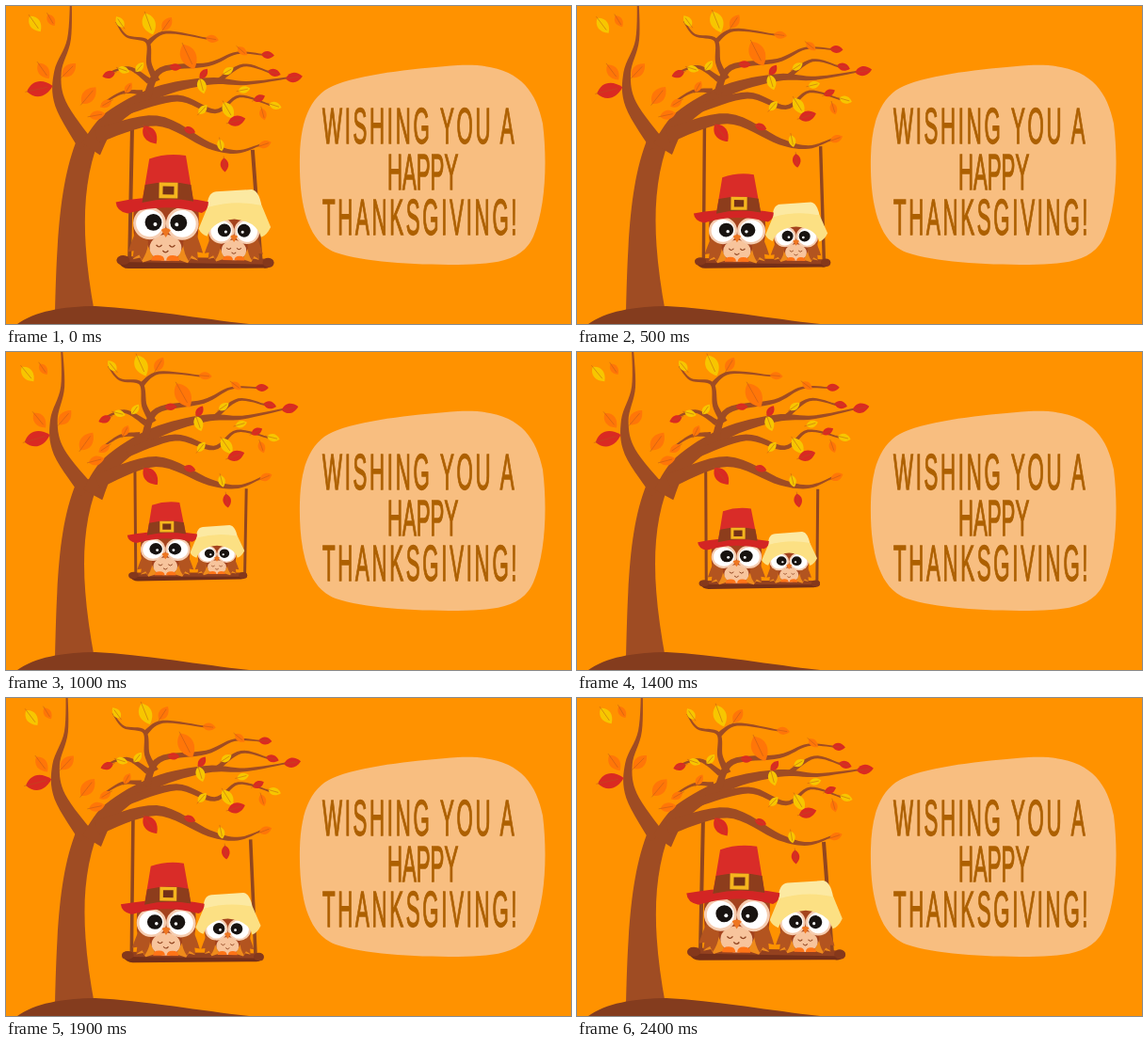
An HTML page for the animation above (2.5 s loop, 600 px wide and 338 px high).

```html
<!DOCTYPE html>
<html lang="en">
<head>
<meta charset="utf-8">
<title>Thanksgiving swing</title>
<style>
html, body { margin: 0; width: 100%; height: 100%; overflow: hidden; background: #ff9200; }
svg { display: block; width: 100vw; height: 100vh; }
text { font: 53px "Liberation Sans", Arial, sans-serif; fill: #ad6000; stroke: #ad6000; stroke-width: 1.5; letter-spacing: 6.4px; }
</style>
</head>
<body>
<svg viewBox="0 0 600 338" preserveAspectRatio="none">
  <defs>
    <g id="wing">
      <path d="M-20 22L-35 39L-27 37L-24 42L-12 38Z" fill="#ef8b1b"/>
      <path d="M-30 4Q-36 18 -40 31L-34 30L-35 38L-28 34L-25 40Q-16 26 -20 12Z" fill="#b3541f"/>
    </g>
    <g id="eye">
      <circle r="17.5" fill="#f6cdb0"/>
      <circle r="14.5" fill="#fff"/>
      <circle cx="4" cy="-1" r="9" fill="#181310"/>
      <circle cx="6" cy="1" r="2" fill="#fff"/>
    </g>
    <path id="line" d="M-3 0q3 4 6 0" fill="none" stroke="#8f431f" stroke-width="1.3"/>
    <path id="foot" d="M-7 40q0 -6 7 -6q7 0 7 6Z" fill="#ff7417"/>
    <g id="owl">
      <path d="M-34 -22Q-38 18 -26 40L26 40Q38 18 34 -22Z" fill="#a4431d"/>
      <use href="#wing"/><use href="#wing" transform="scale(-1 1)"/>
      <ellipse cy="26" rx="17" ry="14" fill="#f7c49c"/>
      <use href="#line" x="-7" y="23"/><use href="#line" x="7" y="23"/><use href="#line" y="29"/>
      <use href="#eye" x="-17.5"/>
      <use href="#eye" transform="translate(17.5 0) scale(-1 1)"/>
      <path d="M-5 7Q0 3 5 7L0 15Z" fill="#ee7621"/>
      <use href="#foot" x="-8"/><use href="#foot" x="8"/>
    </g>
  </defs>

  <path d="M312 160C313 118 325 92 352 83C385 71 440 66 480 63C540 60 562 85 570 125C575 165 573 215 560 245C548 272 520 274 480 275C430 275 380 272 350 262C318 250 311 205 312 160Z" fill="#f8be80"/>
  <g transform="scale(.42 1)">
    <text x="800" y="146">WISHING YOU A</text>
    <text x="964" y="195" style="letter-spacing:0">HAPPY</text>
    <text x="800" y="243">THANKSGIVING!</text>
  </g>

  <path id="ropes" fill="none" stroke="#91461f"/>
  <path id="trunk" fill="#9f4c23"/>
  <path d="M12 338C30 325 60 319 95 319C150 322 210 333 258 338Z" fill="#843c1e"/>
  <g id="crown"></g>

  <g id="swing">
    <rect x="117" y="267" width="168" height="9" rx="4.5" fill="#94411f"/>
    <path d="M119 273H283Q280 278 274 277L130 280Q122 280 119 273Z" fill="#752f18"/>
    <ellipse cx="124" cy="271" rx="7" ry="5" fill="#85381b"/>
    <ellipse cx="279" cy="271" rx="6" ry="5" fill="#85381b"/>
    <use href="#owl" transform="translate(242 238) scale(.78)"/>
    <use href="#owl" transform="translate(169 231)"/>
    <path d="M213 220Q211 197 222 196L260 193Q269 194 272 217Z" fill="#fce9a2"/>
    <path d="M213 213Q242 204 271 210L281 233Q277 242 271 244Q266 227 242 225Q219 227 213 244Q207 242 204 236Z" fill="#fce083"/>
    <path d="M115 209Q167 198 214 207Q214 216 207 219Q168 208 128 221Q116 219 115 209Z" fill="#d32524"/>
    <path d="M143 209L150 162Q169 155 189 158L198 207Q170 202 143 209Z" fill="#d92c28"/>
    <path d="M146 190Q171 184 195 189L198 207Q170 202 143 209Z" fill="#8d3d1c"/>
    <path d="M163 189H179V202H163Z" fill="#743117" stroke="#f5b51e" stroke-width="4"/>
  </g>
</svg>
<script>
const get = id => document.getElementById(id);
const crown = get('crown');
const RED = '#d92a22', ORANGE = '#ff7608', YELLOW = '#f7c600', BARK = '#9f4c23';
const add = markup => crown.insertAdjacentHTML('beforeend', markup);

function leaf(color, x, y, angle = (x * 7 + y * 13) % 120 - 60, size = 13) {
  const h = size / 2, b = size * .38;
  add(`<g transform="translate(${x} ${y}) rotate(${angle})">
    <path d="M${-h} 0C${-h/2} ${-b} ${h/3} ${-b} ${h} 0C${h/3} ${b} ${-h/2} ${b} ${-h} 0Z" fill="${color}"/>
    <path d="M${-h-2} 0H${h*.6}" stroke="#b4541c" stroke-opacity=".55" stroke-width=".8"/></g>`);
}

// Tapered spline through the given points, with a leaf on its tip.
function branch(color, width, ...xy) {
  const n = xy.length / 2 - 1, steps = n * 8;
  const point = (i, k) => xy[2 * Math.max(0, Math.min(n, i)) + k];
  const at = (s, k) => {
    const i = Math.min(n - 1, Math.floor(s)), t = s - i;
    const [a, b, c, d] = [-1, 0, 1, 2].map(j => point(i + j, k));
    return b + t/2 * (c - a + t * (2*a - 5*b + 4*c - d + t * (3*(b - c) + d - a)));
  };
  const left = [], right = [];
  let angle;
  for (let j = 0; j <= steps; j++) {
    const s = j / 8, x = at(s, 0), y = at(s, 1);
    const s0 = Math.max(0, s - .05), s1 = Math.min(n, s + .05);
    angle = Math.atan2(at(s1, 1) - at(s0, 1), at(s1, 0) - at(s0, 0));
    const r = width / 2 * (1 - j / steps) ** 1.4 + .8;
    const dx = r * Math.sin(angle), dy = r * Math.cos(angle);
    left.push(`${x - dx} ${y + dy}`);
    right.unshift(`${x + dx} ${y - dy}`);
  }
  add(`<path d="M${left.concat(right).join('L')}Z" fill="${BARK}"/>`);
  leaf(color, point(n, 0) + 4, point(n, 1), angle * 180 / Math.PI, width > 20 ? 18 : 14);
}

branch(RED, 16, 85,148, 58,104, 55,70, 67,35, 69,-14);
branch(RED, 22, 90,152, 112,120, 160,92, 215,80, 255,82, 302,76);
branch(YELLOW, 8, 130,110, 182,98, 222,112, 248,96, 282,106);
branch(ORANGE, 14, 96,138, 160,122, 215,148, 245,155, 271,147);
branch(RED, 7, 150,96, 165,68, 215,62, 245,50, 274,52);
branch(YELLOW, 6, 160,80, 152,62, 150,38, 128,32, 117,17);
branch(ORANGE, 4, 150,40, 170,28, 215,35);
branch(RED, 5, 152,80, 130,66, 105,73);
branch(ORANGE, 4, 145,92, 124,92, 102,104);
branch(RED, 4, 225,80, 252,63, 281,71);

leaf(RED, 36, 88, -12, 28);
leaf(ORANGE, 40, 69, 55, 20);
leaf(ORANGE, 67, 68, -45, 20);
leaf(YELLOW, 31, 19, 55, 20);
leaf(ORANGE, 48, 15, 60, 14);
leaf(ORANGE, 88, 95, -50, 23);
leaf(ORANGE, 97, 116, -10, 17);
leaf(YELLOW, 152, 19, 70, 24);
leaf(ORANGE, 171, 19, -55, 17);
leaf(ORANGE, 194, 54, 65, 29);
leaf(YELLOW, 208, 85, 75, 17);
leaf(YELLOW, 236, 111, 60, 20);
leaf(RED, 245, 122, -15, 19);
leaf(RED, 153, 137, 55, 23);
leaf(RED, 232, 169, 85, 15);
leaf(YELLOW, 228, 148, 80);
leaf(ORANGE, 273, 115, 75);
leaf(YELLOW, 142, 65, -50);
leaf(YELLOW, 125, 68);
leaf(YELLOW, 209, 110);
leaf(YELLOW, 253, 89);
leaf(YELLOW, 236, 69);
leaf(RED, 195, 132);
leaf(RED, 180, 65);
leaf(RED, 269, 98);
leaf(RED, 210, 72);
leaf(ORANGE, 251, 48);
leaf(ORANGE, 130, 87);

// 0 when nearest to the viewer, 1 when farthest; peak is the farthest moment.
const depth = (t, peak) => (1 + Math.cos((t - peak) / 2500 * 2 * Math.PI)) / 2;

function draw() {
  const t = Math.floor(performance.now() % 2500 / 100) * 100;
  const p = depth(t, 1140), sway = depth(t, 1210);
  const scale = 1 / (1 + .344 * p);
  const bottom = 280 + 15.9*p - 16.2*p*p - 40.3*p*p*p;
  const hang = bottom - 10 * scale;

  crown.setAttribute('transform', `rotate(${-4.6 * sway} 87 127)`);
  const dx = -2 * sway;
  get('trunk').setAttribute('d',
    `M52 326C54 240 ${58+dx} 185 ${76+dx} 140L${104+dx} 130C${78+dx} 185 80 250 94 326Z`);
  get('swing').setAttribute('transform',
    `translate(${201 - 8*p} ${bottom}) rotate(${1 - p}) scale(${scale} ${scale * (1 - .09*p)}) translate(-201 -280)`);
  get('ropes').setAttribute('d',
    `M${134 + 3*p} ${126 - 2*p}L${131 + 7*p} ${hang}M${262 - 7*p} ${153 - 8*p}L${271 - 18*p} ${hang + 1 - p}`);
  get('ropes').setAttribute('stroke-width', 4 * scale);
  requestAnimationFrame(draw);
}
draw();
</script>
</body>
</html>
```
